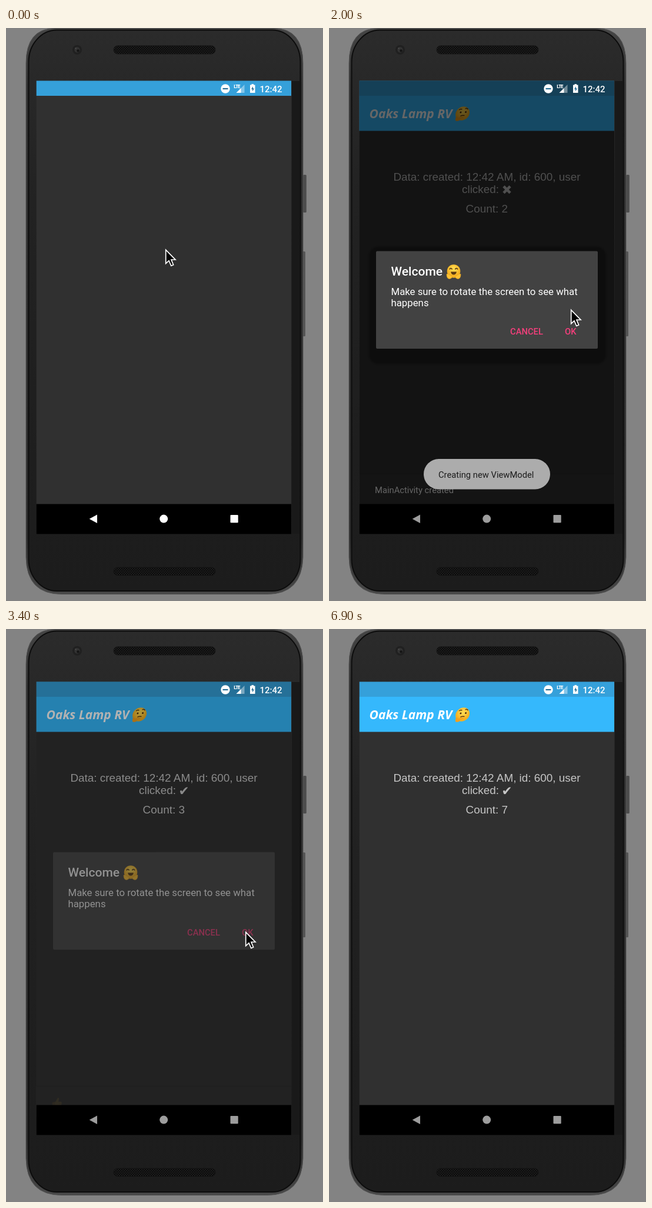
Write an HTML page that moves like this. It is 539 px wide and 972 px high and loops after 7 s.

```html
<!DOCTYPE html>
<html lang="en">
<head>
<meta charset="utf-8">
<style>
  html, body { margin: 0; width: 100%; height: 100%; overflow: hidden; background: #838383; }
  svg { display: block; width: 100vw; height: 100vh; }
  text { font-family: Roboto, sans-serif; fill: #fff; white-space: pre; }
  .small { font-size: 14.75px; }
  .medium { font-weight: 500; }
  .pink { fill: #f53f7c; }
  .data { font: 18.9px "Liberation Sans", Arial, sans-serif; fill: #c6c6c6; }
  .title { font: italic bold 21.07px "Open Sans", "Noto Sans", sans-serif; }
  .mark { font: 21.5px "DejaVu Sans", sans-serif; fill: #c6c6c6; }
</style>
</head>
<body>
<svg viewBox="0 0 539 972" preserveAspectRatio="none">
  <defs>
    <linearGradient id="rim" x2="0" y2="1">
      <stop offset="0" stop-color="#454545"/><stop offset=".1" stop-color="#303030"/>
      <stop offset=".9" stop-color="#2a2a2a"/><stop offset="1" stop-color="#484848"/>
    </linearGradient>
    <linearGradient id="face" x2="0" y2="1">
      <stop offset="0" stop-color="#2b2b2b"/><stop offset=".3" stop-color="#222"/>
      <stop offset="1" stop-color="#1c1c1c"/>
    </linearGradient>
    <pattern id="mesh" width="4" height="4" patternUnits="userSpaceOnUse">
      <rect width="4" height="4" fill="#1d1d1d"/>
      <circle cx="1" cy="1" r="1.1" fill="#070707"/><circle cx="3" cy="3" r="1.1" fill="#070707"/>
    </pattern>
    <radialGradient id="skin" cy=".35"><stop offset=".3" stop-color="#ffd54a"/><stop offset="1" stop-color="#f5b021"/></radialGradient>
    <filter id="soft"><feGaussianBlur stdDeviation="1.5"/></filter>
    <clipPath id="screen"><rect x="51.700" y="89.600" width="433.300" height="769"/></clipPath>
  </defs>

  <!-- phone -->
  <rect width="539" height="972" fill="#838383"/>
  <rect x="505" y="249" width="5.800" height="64" rx="1.500" fill="#4c4c4c"/>
  <rect x="504" y="379" width="5" height="144" rx="1.500" fill="#555"/>
  <path d="M34 60Q34 0.500 84 0.500H455Q505 0.500 505 60V898Q503 960.500 444 960.500H95Q35 960.500 34 898Z" fill="url(#rim)" stroke="#555"/>
  <rect x="38.500" y="3.500" width="462" height="951.500" rx="48" ry="54" fill="url(#face)" stroke="#0c0c0c" stroke-width="2"/>
  <rect x="486" y="90" width="13" height="768" fill="#191919"/>
  <circle cx="121" cy="37" r="8" fill="#202020"/>
  <circle cx="121" cy="37" r="4.700" fill="#323232"/>
  <circle cx="122.500" cy="38.500" r="2.200" fill="#141414"/>
  <circle cx="118.500" cy="34.500" r="1.300" fill="#484848"/>
  <rect x="183" y="30" width="173" height="14" rx="7" fill="url(#mesh)" stroke="#151515"/>
  <rect x="183" y="915" width="173" height="13.500" rx="6.700" fill="url(#mesh)" stroke="#121212"/>

  <g clip-path="url(#screen)">
    <rect x="51" y="89" width="435" height="770" fill="#303030"/>
    <rect x="51" y="89" width="435" height="26" fill="#35a0da"/>

    <g id="app">
      <rect x="51" y="115" width="435" height="59.500" fill="#35b8fc"/>
      <text class="title" x="68.500" y="153">Oaks Lamp RV</text>
      <g transform="translate(227 145.500) skewX(-10)">
        <circle cy="-.500" r="11.800" fill="url(#skin)"/>
        <path d="M-7-6.500q2.500-2.500 5-1M3-8.500q3-2 5 1M-3 4q3-2 7-1" fill="none" stroke="#5b3a12" stroke-width="1.500"/>
        <circle cx="-3.500" cy="-2.500" r="1.500" fill="#4a2d10"/><circle cx="5" cy="-3" r="1.500" fill="#4a2d10"/>
        <path d="M-10 5q2-1.500 3 1.500l8-1.500q2.500 0 1.500 1.800l-5 1.500q0 4-4 4h-2.500q-2.500-2-1-7.300z" fill="#f3a01f"/>
      </g>
      <text class="data" x="268.500" y="259" text-anchor="middle">Data: created: 12:42 AM, id: 600, user</text>
      <text class="data" x="226" y="280">clicked:</text>
      <text class="mark" id="mark" x="293.500" y="282"></text>
      <text class="data" id="count" x="232.500" y="313"></text>
    </g>

    <g id="snack">
      <rect x="51" y="755.500" width="435" height="1.200" fill="#292929"/>
      <rect x="51" y="756.500" width="435" height="51" fill="#313131"/>
      <g id="snackBody">
        <text class="small" id="snackText" x="78" y="788.500">MainActivity created</text>
        <g id="thumb">
          <path d="M79 783.500l5-1 4-7q3 0 2 3l-1 3.500h4q2.500 1 1.500 3l-1 5q-.5 2-3 2h-7l-4-1z" fill="#ffc93a"/>
          <path d="M79 783.500l3.500-.5 1 8-4-.3zM90 785h5M90 788h4.500" fill="#f0a51e" stroke="#d99413" stroke-width=".8"/>
        </g>
      </g>
    </g>

    <rect id="dim" x="51" y="89" width="435" height="719"/>

    <rect id="shade" x="68" y="371" width="403" height="199" rx="16" opacity=".3" filter="url(#soft)"/>
    <g id="dialog">
      <rect x="80" y="378.500" width="377" height="165.500" rx="2" fill="#424242"/>
      <text class="medium" x="105.500" y="420" font-size="21.070">Welcome</text>
      <g transform="translate(212 413.500)">
        <circle cy="-1" r="11.300" fill="url(#skin)"/>
        <path d="M-7-4q2-4 4.500 0M2.500-4q2-4 4.500 0" fill="none" stroke="#5b3a12" stroke-width="1.700"/>
        <path d="M-5 0h10q-1 5-5 5t-5-5z" fill="#5b3a12"/>
        <path d="M-12 4q3-1 5 1.500l4 2q1 3.500-4 4.500-5 0-5-8zM12 4q-3-1-5 1.500l-4 2q-1 3.500 4 4.500 5 0 5-8z" fill="#ffc233" stroke="#e9a522" stroke-width=".7"/>
      </g>
      <g font-size="16.800">
        <text x="105.500" y="452.500">Make sure to rotate the screen to see what</text>
        <text x="105.500" y="472">happens</text>
      </g>
      <text class="small medium pink" x="308" y="520">CANCEL</text>
      <text class="small medium pink" x="401" y="520">OK</text>
    </g>

    <g id="toast">
      <rect x="161" y="731" width="215" height="51.500" rx="25.700" fill="#acacac"/>
      <text class="small" x="186" y="762.500" style="fill:#1c1c1c">Creating new ViewModel</text>
    </g>

    <!-- system bars -->
    <g fill="#fff">
      <circle cx="373" cy="103" r="7.700"/>
      <rect x="368.500" y="101.900" width="9" height="2.200" fill="#286f96"/>
      <text x="387" y="102" font-size="8.500" font-weight="700" style="font-family:'Open Sans',sans-serif" letter-spacing="-1.300">LTE</text>
      <path d="M405.500 96v14h-14z" opacity=".4"/>
      <path d="M391.500 110l8-8v8z"/>
      <path d="M417.500 95h3.500v1.500h2.500v13.500h-8.500v-13.500h2.500z"/>
      <path d="M420 99l-3 4.800h2v3.700l3-5h-2z" fill="#286f96"/>
      <text class="medium" x="431.500" y="108.500" font-size="15">12:42</text>
    </g>
    <rect x="51" y="807.500" width="435" height="52"/>
    <g id="nav">
      <path d="M141.700 832.700l13.300-7.200v14.400z"/>
      <circle cx="268.200" cy="832.600" r="7"/>
      <rect x="381.500" y="826" width="13.200" height="13.200" rx="1"/>
    </g>
    <circle id="touch" cx="408" cy="517" r="9.500" fill="#d3c3cb" fill-opacity=".75" stroke="#a9a0a5" stroke-opacity=".6" stroke-width="2"/>
  </g>

  <path id="cursor" d="M.7 1.300V24.500L6 19.700 9.800 28.300 13.600 26.700 10 18H17Z" stroke="#fff" stroke-width="1.700"/>
</svg>

<script>
const LOOP = 7000, STEP = 100;
const $ = id => document.getElementById(id);
const clamp = x => Math.min(1, Math.max(0, x));
const fade = (id, o) => $(id).setAttribute('opacity', o);
const show = (id, on) => $(id).style.display = on ? '' : 'none';

// cubic-bezier(.4, 0, .2, 1)
function ease(x) {
  x = clamp(x);
  let lo = 0, hi = 1, u;
  for (let i = 0; i < 20; i++) {
    u = (lo + hi) / 2;
    if (1.2 * u * (1 - u) ** 2 + .6 * u * u * (1 - u) + u ** 3 < x) lo = u; else hi = u;
  }
  return 3 * u * u - 2 * u ** 3;
}

// time, x, y
const PATH = [
  [0, 271, 375], [1600, 271, 375], [1800, 350, 428], [1900, 395, 465], [2000, 411, 477],
  [2300, 407, 513], [4700, 407, 513], [5000, 443, 605], [5100, 495, 653], [5200, 490, 730],
  [5400, 441, 873], [5500, 441, 873], [5700, 425, 930], [5800, 415, 975]
];
function cursorAt(t) {
  const i = PATH.findIndex(p => p[0] > t);
  if (i < 0) return [0, 1000];
  const [t0, x0, y0] = PATH[i - 1], [t1, x1, y1] = PATH[i], k = (t - t0) / (t1 - t0);
  return [x0 + (x1 - x0) * k, y0 + (y1 - y0) * k];
}

function drawSnack(t) {
  const second = t >= 3300, age = t - (second ? 3300 : 300);
  const drop = 51 * (1 - ease(age / 250) + ease((age - 1765) / 250));
  $('snack').setAttribute('transform', `translate(0 ${drop})`);
  fade('snackBody', clamp((age - 85) / 165) - clamp((age - 1795) / 180));
  show('snack', drop < 50.9);
  show('snackText', !second);
  show('thumb', second);
}

function draw(t) {
  show('app', t >= 100);
  $('count').textContent = 'Count: ' + Math.floor((t + 300) / 1000);
  $('mark').textContent = t < 3300 ? '✖' : '✔';
  drawSnack(t);

  const leave = clamp((t - 3300) / 200);
  fade('dim', .6 * (clamp((t - 225) / 200) - leave));
  const open = clamp((t - 220) / 160);
  fade('dialog', open - leave);
  const s = .9 + .1 * open;
  $('dialog').setAttribute('transform', `translate(268.5 461) scale(${s}) translate(-268.5 -461)`);
  show('shade', t >= 500 && t < 3400);
  fade('toast', clamp((t - 360) / 200) - clamp((t - 2350) / 200));

  $('nav').setAttribute('fill', t < 600 ? '#fff' : '#9d9d9d');
  show('touch', t >= 3100 && t < 3300);
  $('cursor').setAttribute('transform', `translate(${cursorAt(t)})`);
}

function frame(now) {
  draw(Math.floor(now % LOOP / STEP) * STEP);
  requestAnimationFrame(frame);
}
draw(0);
requestAnimationFrame(frame);
</script>
</body>
</html>
```
